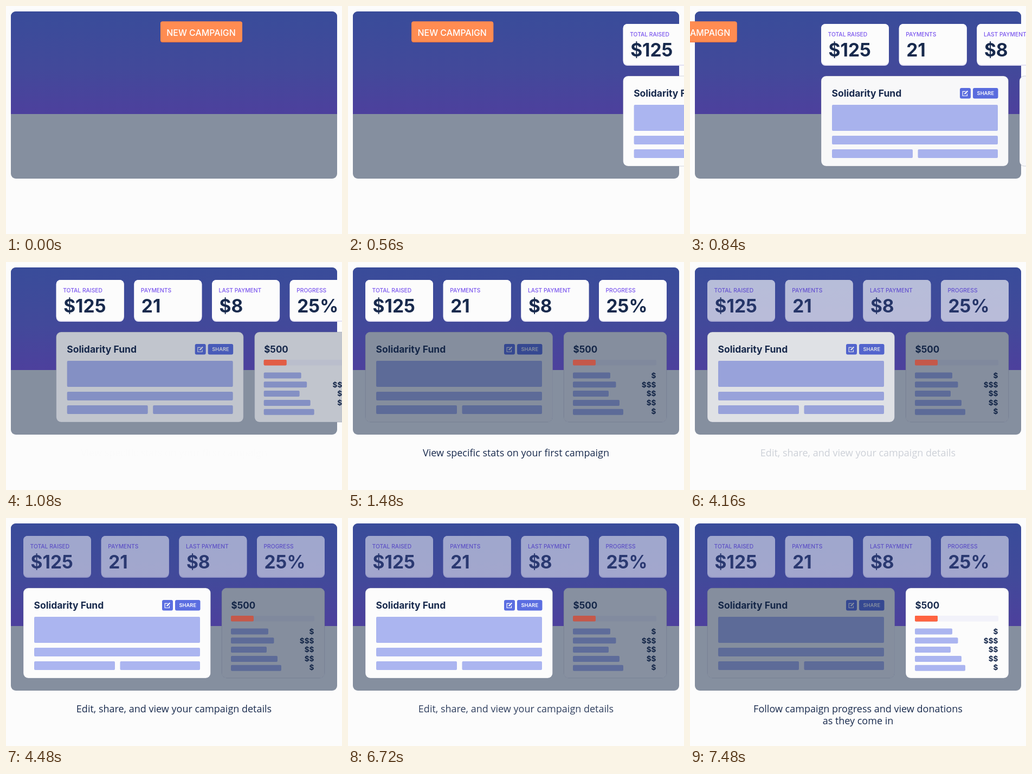
Animation of 620 by 420 pixels, one loop 8 s. Source, as an HTML page:

```html
<!DOCTYPE html>
<html lang="en">
<head>
<meta charset="utf-8">
<title>Campaign dashboard</title>
<style>
  html, body { margin: 0; width: 100%; height: 100%; overflow: hidden; background: #fcfcfc; }
  svg { display: block; width: 620px; height: 420px; }
  text { font-family: Inter, sans-serif; font-weight: 700; fill: #182a4d; }
  .label { font-size: 10.3px; font-weight: 500; fill: #7a55ee; }
  .value { font-size: 33.5px; }
  .title { font-size: 17.5px; }
  .caption { font: 18px "Open Sans", sans-serif; text-anchor: middle; }
  .money { font-size: 13.6px; text-anchor: end; }
  .card { fill: #fcfcfc; stroke: #6a7590; stroke-opacity: .3; }
  .bar { fill: #abb5f0; }
  .shade { fill: #102242; }
</style>
</head>
<body>
<svg viewBox="0 0 620 420">
  <defs>
    <linearGradient id="sky" x1="0" y1="0" x2="0" y2="1">
      <stop offset="0" stop-color="#394c9a"/>
      <stop offset=".55" stop-color="#42499a"/>
      <stop offset="1" stop-color="#4d409d"/>
    </linearGradient>
    <clipPath id="round"><rect x="9" y="10" width="602" height="308" rx="9"/></clipPath>
  </defs>

  <g clip-path="url(#round)">
    <rect x="9" y="10" width="602" height="308" fill="#858f9f"/>
    <rect x="9" y="10" width="602" height="189" fill="url(#sky)"/>
  </g>

  <g id="button">
    <rect x="285" y="28.5" width="151" height="38.5" rx="4" fill="#f0703f"/>
    <rect x="285" y="28.5" width="151" height="37.5" rx="4" fill="#ff8c52"/>
    <text x="360" y="54.5" text-anchor="middle" style="font-size:15.9px;font-weight:500;fill:#fff">NEW CAMPAIGN</text>
  </g>

  <g id="board">
    <g id="stats"></g>

    <g>
      <rect class="card" x="32" y="129" width="345.5" height="166" rx="9"/>
      <text class="title" x="51.5" y="166.5">Solidarity Fund</text>
      <g fill="#5b6ee1">
        <rect x="288" y="151" width="20" height="19.5" rx="3"/>
        <rect x="312" y="151" width="46.5" height="19.5" rx="3"/>
      </g>
      <g fill="none" stroke="#fff" stroke-width="1.2">
        <path d="M298.5 157.3H293.2V165.5H301.4V161.6"/>
        <path d="M296.6 162.2L302.3 156.5" stroke-width="2.2"/>
      </g>
      <text x="335.3" y="164.3" text-anchor="middle" style="font-size:9.3px;font-weight:600;fill:#fff">SHARE</text>
      <rect class="bar" x="52" y="182" width="306" height="48" rx="2"/>
      <rect class="bar" x="52" y="239" width="306" height="16" rx="2"/>
      <rect class="bar" x="52" y="264" width="149" height="16" rx="2"/>
      <rect class="bar" x="210.5" y="264" width="147.5" height="16" rx="2"/>
      <rect class="shade" id="shadeLeft" x="32" y="129" width="345.5" height="166" rx="9"/>
    </g>

    <g>
      <rect class="card" x="398" y="129" width="190" height="166" rx="9"/>
      <text class="title" x="415.5" y="167" style="font-size:17px">$500</text>
      <rect x="415" y="180" width="154" height="10.5" rx="2" fill="#f2f2fa"/>
      <g id="gifts"></g>
      <rect class="shade" id="shadeRight" x="398" y="129" width="190" height="166" rx="9"/>
      <rect x="415" y="180" width="42" height="10.5" rx="2" fill="#c5584a"/>
      <rect id="progress" x="415" y="180" width="42" height="10.5" rx="2" fill="#ff6340"/>
    </g>
  </g>

  <text class="caption" x="310" y="358">View specific stats on your first campaign</text>
  <text class="caption" x="310" y="358">Edit, share, and view your campaign details</text>
  <text class="caption" x="310" y="358">Follow campaign progress and view donations<tspan x="310" y="380">as they come in</tspan></text>
</svg>

<script>
const LOOP = 8000, FADE = 800, STEPS = [680, 3680, 6680];
const $ = id => document.getElementById(id);
const captions = document.querySelectorAll('.caption');

$('stats').innerHTML = [
  ['TOTAL RAISED', '$125', 32], ['PAYMENTS', '21', 175.7],
  ['LAST PAYMENT', '$8', 319.4], ['PROGRESS', '25%', 463]
].map(([label, value, x]) => `
  <rect x="${x}" y="33" width="125" height="77" rx="8" fill="#e3e1f2"/>
  <rect x="${x}" y="33" width="125" height="75" rx="8" fill="#fcfcfc"/>
  <text class="label" x="${x + 12.5}" y="55.7">${label}</text>
  <text class="value" x="${x + 13.5}" y="92.8">${value}</text>`).join('');

$('gifts').innerHTML = [[69, 1], [79.5, 3], [66, 2], [86, 2], [93, 1]].map(([w, n], i) => `
  <rect class="bar" x="415" y="${203.5 + i * 16.8}" width="${w}" height="11" rx="2"/>
  <text class="money" x="568.5" y="${214 + i * 16.5}">${'$'.repeat(n)}</text>`).join('');

const ramp = (t, start, length) => Math.min(1, Math.max(0, (t - start) / length));
const quad = u => u < .5 ? 2 * u * u : 1 - 2 * (1 - u) ** 2;
const cubic = u => u < .5 ? 4 * u ** 3 : 1 - 4 * (1 - u) ** 3;

function draw(t) {
  const slide = quad(ramp(t, 0, 1360));
  $('button').setAttribute('transform', `translate(${-493 * slide} 0)`);
  $('board').setAttribute('transform', `translate(${721 * (1 - slide)} 0)`);

  const [first, second, third] = STEPS.map(s => cubic(ramp(t, s, FADE)));
  $('stats').style.opacity = 1 - second * .48;
  $('shadeLeft').style.opacity = .5 * (first - second + third);
  $('shadeRight').style.opacity = .5 * (first - third);
  $('progress').style.opacity = 1 - first + third;

  // Each caption leaves in the first half of a step; the next enters in the second.
  captions.forEach((c, i) => {
    const enter = ramp(t, STEPS[i] + FADE / 2, FADE / 2);
    const leave = i < 2 ? ramp(t, STEPS[i + 1], FADE / 2) : 0;
    c.style.opacity = enter - leave;
  });
}

const begin = performance.now();
function tick() {
  draw((performance.now() - begin) % LOOP);
  requestAnimationFrame(tick);
}
tick();
</script>
</body>
</html>
```
